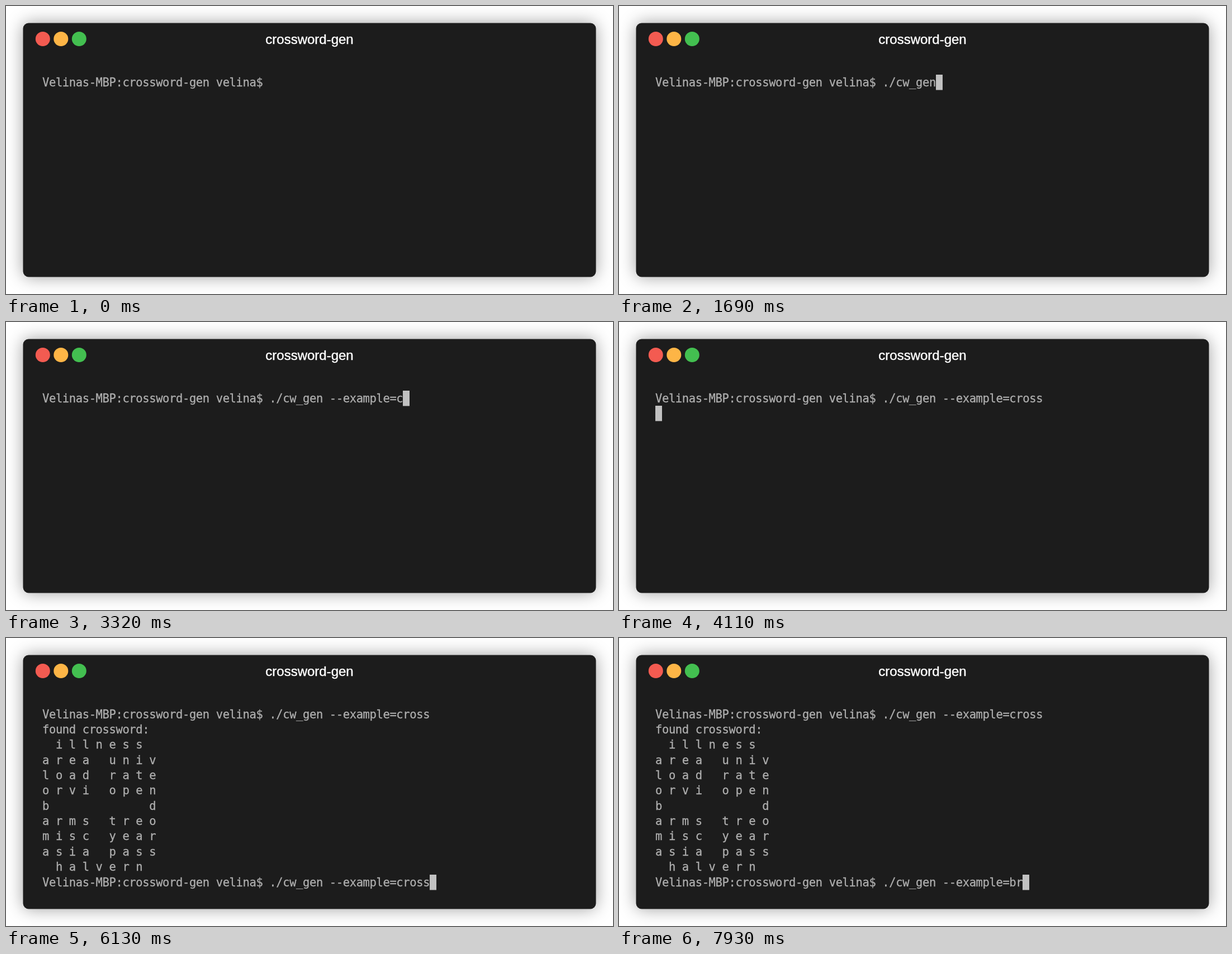
Animation, 1086 px wide and 516 px high, one loop 8000 ms. Source, as an HTML page with a canvas:

```html
<!DOCTYPE html>
<html lang="en">
<head>
<meta charset="utf-8">
<title>crossword-gen</title>
<style>
  html, body { margin: 0; width: 100%; height: 100%; overflow: hidden; background: #fff; }
  canvas { display: block; }
</style>
</head>
<body>
<canvas id="stage" width="1086" height="516"></canvas>
<script>
const ctx = document.getElementById('stage').getContext('2d');
const LOOP = 8000;
const CELL_W = 11.95, CELL_H = 27.36, LEFT = 65, TOP = 123;
const PROMPT = 'Velinas-MBP:crossword-gen velina$ ';
const COMMAND = './cw_gen --example=cross';
const STEM = './cw_gen --example=';

const grid = [
  ' illness', 'area univ', 'load rate', 'orvi open', 'b       d',
  'arms treo', 'misc year', 'asia pass', ' halvern'
].map(row => row.split('').join(' '));

// One entry per key press of the first command.
const keys = [
  500, 650, 790, 960, 1220, 1390, 1460, 1690, 1920, 2070, 2200, 2340,
  2550, 2650, 2750, 2900, 3005, 3110, 3215, 3320, 3520, 3625, 3730, 3880
];
const ENTER = 4110, OUTPUT = 5110, READY = 5210;

// The second command line: recalled, shortened, then retyped.
const edits = [
  [READY, ''], [6130, COMMAND], [6610, STEM + 'cros'], [6735, STEM + 'cro'],
  [6860, STEM + 'cr'], [7020, STEM + 'c'], [7170, STEM],
  [7850, STEM + 'b'], [7930, STEM + 'br']
];

function screenAt(t) {
  const typed = COMMAND.slice(0, keys.filter(k => k <= t).length);
  const lines = [PROMPT + typed];
  if (t >= OUTPUT) lines.push('found crossword:', ...grid);
  if (t >= READY) lines.push(PROMPT + edits.filter(e => e[0] <= t).pop()[1]);
  else if (t >= ENTER) lines.push('');
  return lines;
}

// Filled text with a hairline outline for a slightly heavier weight.
function drawText(text, x, y) {
  ctx.fillText(text, x, y);
  ctx.strokeText(text, x, y);
}

function drawWindow() {
  ctx.fillStyle = '#fff';
  ctx.fillRect(0, 0, 1086, 516);

  ctx.save();
  ctx.shadowColor = 'rgba(0,0,0,.38)';
  ctx.shadowBlur = 30;
  ctx.fillStyle = '#1c1c1c';
  ctx.beginPath();
  ctx.roundRect(30.5, 30.5, 1025, 455, 10);
  ctx.fill();
  ctx.restore();

  ['#f35b51', '#fdb546', '#43bf50'].forEach((color, i) => {
    ctx.fillStyle = color;
    ctx.beginPath();
    ctx.arc(65.8 + 32.5 * i, 59, 13, 0, Math.PI * 2);
    ctx.fill();
  });

  ctx.font = '24px "Liberation Sans", Arial, sans-serif';
  ctx.textAlign = 'center';
  ctx.fillStyle = ctx.strokeStyle = '#fff';
  ctx.lineWidth = 0.45;
  drawText('crossword-gen', 543, 67.5);
}

function drawLine(text, row) {
  const y = Math.round(TOP + 20.6 + row * CELL_H);
  [...text].forEach((ch, col) => {
    if (ch !== ' ') drawText(ch, LEFT + col * CELL_W, y);
  });
}

function drawCursor(col, row) {
  const x = Math.round(LEFT + col * CELL_W);
  const y = Math.round(TOP + row * CELL_H);
  ctx.fillStyle = '#c1c1c1';
  ctx.fillRect(x, y, 12, 27.5);
}

function draw(t) {
  drawWindow();
  const lines = screenAt(t);
  ctx.font = '20.5px "DejaVu Sans Mono", monospace';
  ctx.textAlign = 'left';
  ctx.fillStyle = ctx.strokeStyle = '#afafaf';
  ctx.lineWidth = 0.3;
  lines.forEach(drawLine);
  if (t >= keys[0]) drawCursor(lines[lines.length - 1].length, lines.length - 1);
}

const start = performance.now();
function tick() {
  draw((performance.now() - start) % LOOP);
  requestAnimationFrame(tick);
}
tick();
</script>
</body>
</html>
```
